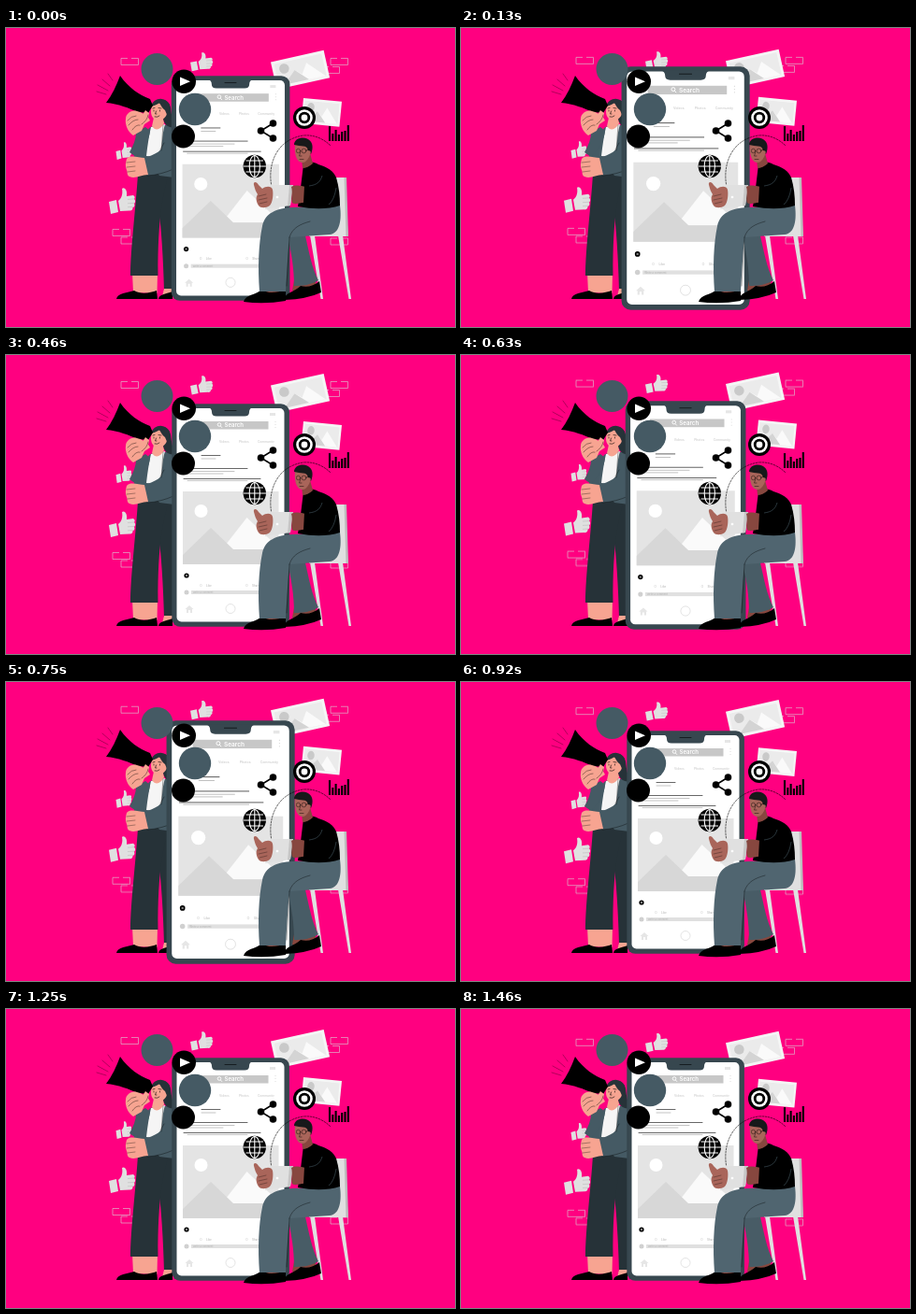
Animation of 480x320 px, one loop 1.5 s. Source, as an HTML page:

```html
<!DOCTYPE html>
<html lang="en">
<head>
<meta charset="utf-8">
<title>Social media campaign</title>
<style>
  html, body { margin: 0; height: 100%; overflow: hidden; background: #ff0080; }
  svg { display: block; width: 100%; height: 100%; }
  text { font-family: Inter, sans-serif; font-weight: 600; }
  .slate { fill: #455a64; }
  .navy { fill: #263238; }
  .skin { fill: #f7a491; }
  .brown { fill: #a9655a; }
  .deep { fill: #87473f; }
  .pale { fill: #e0e0e0; }
  .white { fill: #fff; }
  .line { fill: none; stroke: #000; stroke-width: .6; stroke-linecap: round; }
  .soft { fill: none; stroke: #d9d9d9; stroke-width: .7; }
</style>
</head>
<body>
<svg viewBox="0 0 480 320">
  <defs>
    <g id="thumb" class="pale">
      <path d="M0 15 8 13 10 26 2 28Z"/>
      <path d="M10 14C14 11 15 6 14 1 17-1 20 3 19 9L26 8C28 9 28 11 27 12 29 14 28 16 27 17 28 19 27 21 25.5 21 26 23 24 25 22 24.5L12 25Z"/>
      <path d="M20 12.5 27 12M20 16.8 27 16.5M20 20.8 25.5 20.5" stroke="#b5b5b5" stroke-width=".5"/>
    </g>
    <g id="card">
      <path d="M0 0H58V30H0Z" fill="#f5f5f5"/>
      <path d="M3 3H55V27H3Z" fill="#ebebeb"/>
      <circle cx="12.5" cy="10" r="5.3" fill="#c9c9c9"/>
      <path d="M9 27 23 14 30 20 37 9 54 27Z" fill="#fafafa"/>
      <path d="M9 27 23 14 36 27Z" fill="#d4d4d4"/>
    </g>
    <path id="brick" d="M11 0H18.5V7H0V0H7"/>
  </defs>

  <g id="floaters">
    <g class="soft" opacity=".85">
      <use href="#brick" x="123" y="32.5"/>
      <use href="#brick" x="347" y="32.5"/>
      <use href="#brick" x="338" y="41.5"/>
      <use href="#brick" x="114" y="215.5"/>
      <use href="#brick" x="123" y="224"/>
      <use href="#brick" x="347" y="225"/>
    </g>
    <use href="#card" transform="translate(283 36.5) rotate(-12.5)"/>
    <use href="#card" transform="translate(318 75) rotate(5.5) scale(.71 .9)"/>
    <use href="#thumb" transform="translate(197 26) scale(.86 .73)"/>
    <use href="#thumb" transform="translate(110 171)"/>
    <use href="#thumb" transform="translate(117.5 122) scale(.6 .68)"/>
  </g>

  <g id="woman">
    <path class="line" opacity=".5" d="M109 49 114 56M103 55 111 62M98 61 109 67M97 68 107 71"/>
    <path class="navy" d="M160 155H180V282H169C168 245 166 215 163 190Z"/>
    <path class="skin" d="M135 262H162L161.5 284 136 283ZM169 279H178V287H167Z"/>
    <path d="M118 290C119 284 130 283 137 281 145 286 155 283 161 281L162 290ZM163 290C164 285 170 285 178 282V290Z"/>
    <path class="navy" d="M141 156H174C169 174 162 200 162.5 265H133C133 238 139 190 141 156Z"/>
    <path class="slate" d="M153 107C159 103 170 102 180 106V160L164 158 154 144 141 152C137 145 136 139 138 134 143 126 148 115 153 107Z"/>
    <path d="M155 106 170 103C166 116 168 126 164 138L150 137Q152 119 155 106Z" fill="#f5f5f5"/>
    <path d="M156 105C160 111 165 109 169 102L168 96H158Z" class="skin"/>
    <path d="M158 81C163 74 174 76 176 85 177 94 178 100 182 106 175 108 169 104 168 97L170 86Z" class="navy"/>
    <path class="skin" d="M157 81C163 79 170 82 172 87 174 94 167 101 160 98 154 96 154 87 157 81Z"/>
    <path class="navy" d="M155 84C158 74 170 73 175 82L173 95 170 88C167 86 165 82 164 80 160 83 158 83 155 84Z"/>
    <path class="line" d="M158 88V89M164.5 88V89M160.5 89 159.5 92H161M159 95Q162 96 164 94M157 86 159 85.5M163 85.5 166 86"/>
    <path class="slate" d="M139 112 149 106 154 110C153 120 147 130 139 138L132 133C136 126 139 119 139 112Z"/>
    <path d="M122 51C118 62 113 72 107 80 120 81 132 86 141 90L152 91 157 83 154 76C143 72 131 64 122 51Z"/>
    <path class="skin" d="M128 97C128 92 134 87 140 89 145 90 148 93 151 94L154 99 148 103 145 110 136 115C130 111 127 103 128 97Z"/>
    <path class="skin" d="M141 98C144 95 147 92 149 88L153 91C153 96 149 101 145 103Z"/>
    <path class="line" opacity=".65" d="M130 99Q134 94 139 94M131 104Q136 98 141 98M135 109Q139 103 143 104M145 103Q151 99 152 93"/>
    <path class="slate" d="M148 139C159 136 168 131 171 121L180 126V151Q166 157 151 158Z"/>
    <path d="M151 158Q166 157 179 151M169 123 165 130M168 104 166 131" class="line" opacity=".6"/>
    <path class="skin" d="M129 140C133 135 142 139 148 139L152 157C144 157 138 162 132 159 129 158 130 154 129 152 127 148 128 144 129 140Z"/>
    <path class="line" opacity=".55" d="M129 144 138 143M129 149 138 148M130 154 138 153"/>
  </g>

  <g id="phone">
    <rect x="177.3" y="52.2" width="125.6" height="238.6" rx="9" fill="#37474f"/>
    <rect x="182.5" y="57" width="115" height="228.5" rx="5" class="white"/>
    <path d="M216 56H264Q260 57 260 61 260 65.5 255 65.5H225Q220 65.5 220 61 220 57 216 56Z" fill="#37474f"/>
    <path class="line" d="M234 59.5H246"/>
    <path d="M282 62H288V65H282Z" fill="#e6e6e6"/>
    <rect x="203" y="71" width="77.5" height="8.5" fill="#c7c7c7"/>
    <g fill="none" stroke="#fff" stroke-width=".9"><circle cx="228" cy="74.5" r="1.8"/><path d="M229.3 76 231 77.8"/></g>
    <text x="233.5" y="77.4" font-size="6" class="white">Search</text>
    <path d="M288 71V79" stroke="#ddd" stroke-dasharray="1 2"/>
    <g font-size="3.2" fill="#d0d0d0">
      <text x="228" y="94">Videos</text><text x="249" y="94">Photos</text><text x="269" y="94">Community</text>
    </g>
    <path class="line" d="M209 107.5H229M190 121.5H258M190 132.5H272"/>
    <path class="line" opacity=".4" d="M209 111H224M190 124.5H244M190 127H232M194 134.5H258"/>
    <path d="M189 146H291.5V224H189Z" fill="#e4e4e4"/>
    <circle cx="208.5" cy="167" r="7" class="white"/>
    <path d="M231 208 257.5 174 291.5 206V208Z" fill="#fafafa"/>
    <path d="M189 214 219 185 243 208H291.5V224H189Z" fill="#d7d7d7"/>
    <circle cx="193" cy="236" r="2.6"/><path class="white" d="M192 235H194V237H192Z" opacity=".5"/>
    <g font-size="3" fill="#c4c4c4">
      <text x="207" y="247.5">&#9675;</text><text x="214" y="247.5">Like</text>
      <text x="256" y="247.5">&#9675;</text><text x="263" y="247.5">Share</text>
    </g>
    <rect x="198" y="252" width="78" height="4" fill="#e0e0e0"/>
    <text x="200" y="255" font-size="2.6" fill="#bbb">Write a comment</text>
    <circle cx="193" cy="254" r="2.5" fill="#d0d0d0"/>
    <path d="M191.5 272 196 268 200.5 272H199V276H197V273H195V276H193V272Z" fill="#e6e6e6"/>
    <circle cx="240" cy="271.5" r="5" class="soft"/>
  </g>

  <path class="line" stroke-dasharray="1.8 1.4" d="M284 170C279 145 290 119 318 115 330 114 340 119 347 126"/>

  <g id="chair">
    <path class="pale" d="M325 222H330L339 290H336.5ZM355 222H360L369 290H366.5Z"/>
    <path class="pale" d="M345 160H363L365.5 223H324V215H347Z"/>
    <path d="M361.5 160H364L366 223H363.5Z" fill="#bdbdbd"/>
  </g>

  <g id="man">
    <path class="deep" d="M308 270H331V281H306ZM272 279H297V287H272Z"/>
    <path d="M297 290C299 283 309 282 315 276 322 278 329 276 335 271L337 283Q322 290 298 291Z"/>
    <path d="M254 293C256 285 267 286 273 280 281 285 290 283 299 280V292Q276 296 254 293Z"/>
    <path d="M302 214 319 218C324 240 327 257 334 270 326 275 317 276 308 276 308 258 305 240 302 228Z" fill="#485c66"/>
    <path d="M357 190C359 205 357 220 346 221L303 224C301 246 300 266 299 282H271C269 256 270 231 274 212 277 198 289 193 306 192Z" fill="#506570"/>
    <path class="line" opacity=".6" d="M303 224C306 214 314 210 325 207M303 224 300 276"/>
    <path d="M318 146C322 142 328 143 334 146 344 149 350 153 353 160 356 170 357 180 357 190Q338 196 312 191L315 171Z"/>
    <path class="deep" d="M316 139 325 134 328 145C325 148 320 150 317 150Z"/>
    <path class="brown" d="M309 125C314 120 323 120 326 126 327 135 322 145 316 144 310 143 308 133 309 125Z"/>
    <path d="M308 125C308 118 317 116 322 118.5 328 121 329 128 326 135L322.5 130C322 125 315 127 308 125Z" fill="#17191a"/>
    <circle cx="324" cy="133" r="1.8" class="brown"/>
    <g class="line" opacity=".75"><circle cx="312.5" cy="131.5" r="2.2"/><circle cx="318.5" cy="131.5" r="2.4"/><path d="M321 131 324 130M315 132 313.5 137H316M314 140.5H318"/></g>
    <path class="pale" d="M282 168H307L304 190 277 194Z"/>
    <path d="M303 168H307L304 190 301 190.5Z" fill="#c7c7c7"/>
    <circle cx="290" cy="181" r="1.3" fill="#fff"/>
    <path class="brown" d="M265 168C264 164 268 164 270 168L274 172C278 169 284 169 285 173 286 178 285 187 282 190 278 193 272 193 270 190 267 185 267 181 269 178 267 175 266 172 265 168Z"/>
    <path class="line" opacity=".5" d="M270 180 278 178M270 184 279 182M271 188 279 186"/>
    <path class="deep" d="M305 170C310 167 317 169 323 171L321 187C315 186 310 190 306 187 304 182 307 177 305 170Z"/>
    <path d="M339 154C336 162 334 167 332 168L319 169 318 187 343 191C350 184 354 174 353 160Z"/>
    <path d="M338 158C336 165 332 168 324 169M345 189Q351 184 353 171" fill="none" stroke="#455a64" stroke-width=".6"/>
  </g>

  <g id="badges">
    <circle cx="161.5" cy="44" r="17" class="slate"/>
    <circle cx="190.2" cy="57.3" r="12.8"/>
    <path class="white" d="M186 52.5 197 57.3 186 62Z"/>
    <circle cx="202" cy="87" r="17.2" class="slate"/>
    <circle cx="189.5" cy="116" r="12.5"/>
    <path d="M285.5 102 272.5 110 285.5 118" fill="none" stroke="#000" stroke-width="1.6"/>
    <circle cx="285.5" cy="102" r="3.8"/><circle cx="272.5" cy="110" r="3.8"/><circle cx="285.5" cy="118" r="3.8"/>
    <circle cx="265.8" cy="148" r="12.2"/>
    <g fill="none" stroke="#fff" stroke-width="1.1">
      <ellipse cx="265.8" cy="148" rx="5.6" ry="11.5"/>
      <path d="M265.8 136V160M254 148H278M256.5 142H275M256.5 154H275"/>
    </g>
    <circle cx="319" cy="96" r="12"/><circle cx="319" cy="96" r="8.8" class="white"/>
    <circle cx="319" cy="96" r="6.2"/><circle cx="319" cy="96" r="3.4" class="white"/>
    <path d="M346 121V105M349.3 121V113M352.6 121V109M355.9 121V114M359.2 121V111M362.5 121V110M365.8 121V104" stroke="#000" stroke-width="2.1"/>
  </g>
</svg>
<script>
  const LOOP = 1500, STEPS = 36, RISE = 6.4;
  const floaters = document.getElementById('floaters');
  const phone = document.getElementById('phone');
  const beats = [[0, 1], [.1, 1.1], [.3, 1], [.4, 1], [.5, 1.1], [.6, 1], [1, 1]];

  function heartbeat(p) {
    const i = beats.findIndex(([at]) => at > p);
    const [p0, s0] = beats[i - 1], [p1, s1] = beats[i];
    return s0 + (s1 - s0) * (p - p0) / (p1 - p0);
  }

  // The motion is stepped at 24 poses per second, each held until the next.
  function draw(time) {
    const step = Math.floor(time / LOOP * STEPS + .12) % STEPS;
    const p = (step + .3) / STEPS;
    const lift = RISE * (1 - Math.abs(2 * p - 1));
    floaters.setAttribute('transform', `translate(0 ${-lift})`);
    phone.setAttribute('transform', `translate(240 171.5) scale(${heartbeat(p)}) translate(-240 -171.5)`);
    requestAnimationFrame(() => draw(performance.now() - start));
  }

  const start = performance.now();
  draw(0);
</script>
</body>
</html>
```
